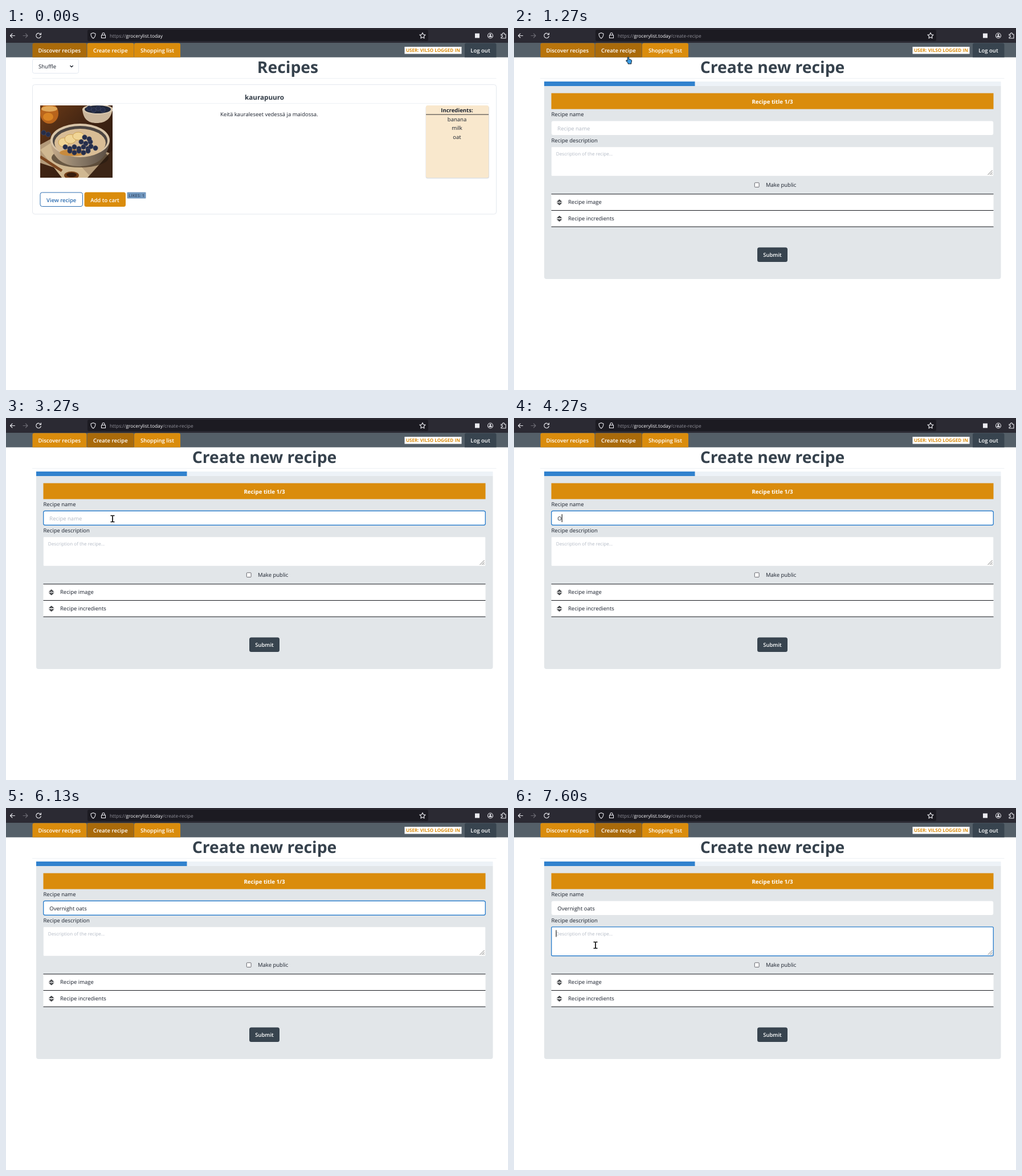
An HTML page for the animation above (8000 ms loop, 881 by 636 pixels).

```html
<!DOCTYPE html>
<html lang="en">
<head>
<meta charset="utf-8">
<title>Recipes</title>
<style>
  html, body { margin: 0; width: 100%; height: 100%; overflow: hidden; background: #fff; }
  svg { display: block; width: 881px; height: 636px; }
  text { font: 9.5px "Open Sans", "Noto Sans", sans-serif; fill: #1a202c; text-rendering: geometricPrecision; white-space: pre; }
  .mid { text-anchor: middle; }
  .semi { font-weight: 600; }
  .bold { font-weight: 700; }
  .white { fill: #fff; }
  .title { font-size: 28.3px; font-weight: 700; fill: #36424d; }
  .hint { fill: #b3bac5; }
  .url { font-size: 8.35px; fill: #fbfbfe; }
  .dim { fill: #92929b; }
  .icon { fill: none; stroke: #ececf1; stroke-width: 1.1; stroke-linecap: round; stroke-linejoin: round; }
  .rule { stroke: #edf1f5; }
  .dark { stroke: #15181d; }
</style>
</head>
<body>
<svg viewBox="0 0 881 636">
  <defs>
    <linearGradient id="table" x2="1" y2="1">
      <stop offset="0" stop-color="#6d3b17"/><stop offset=".45" stop-color="#402413"/><stop offset="1" stop-color="#2b190f"/>
    </linearGradient>
    <linearGradient id="glaze" x2="1">
      <stop offset="0" stop-color="#c6ab8a"/><stop offset=".4" stop-color="#93836f"/><stop offset="1" stop-color="#574b41"/>
    </linearGradient>
    <clipPath id="frame"><rect x="60" y="136" width="127" height="127"/></clipPath>
    <g id="sorter">
      <circle r="5.2" fill="#dcdcdc"/>
      <path d="M-4.2-.9 0-5 4.2-.9zM-4.2 .9 0 5 4.2 .9z" fill="#25282c"/>
      <path d="M-1.6-1.4 0-3 1.6-1.4zM-1.6 1.4 0 3 1.6 1.4z" fill="#aaa"/>
    </g>
  </defs>

  <!-- browser bar -->
  <rect width="881" height="26" fill="#2b2a33"/>
  <rect x="143" y="3" width="598" height="20" rx="3" fill="#1c1b22"/>
  <g class="icon">
    <path d="M15.5 13.5h-8m3.5-3.5-3.5 3.5 3.5 3.5"/>
    <path d="M30 13.5h8m-3.500-3.500 3.500 3.500-3.500 3.500" stroke="#6c6b74"/>
    <path d="M61 11.500A4.300 4.300 0 1 0 61.300 14.500M61.500 8.800v3h-3"/>
    <path d="M153 8.500 157 10c0 4-1 6.500-4 8.300-3-1.800-4-4.300-4-8.300z"/>
    <path d="M167.500 12.500h7v5h-7zM169 12.500v-2a2 2 0 0 1 4 0v2"/>
    <path d="m731 8.300 1.500 3.200 3.500.5-2.600 2.500.7 3.500-3.100-1.700-3.100 1.700.7-3.500-2.600-2.500 3.500-.5z"/>
    <circle cx="850" cy="13.500" r="4.500"/>
    <path d="M869 11h2.500v-1a1.500 1.500 0 0 1 3 0v1h2.500v7h-8v-2h1a1.500 1.500 0 0 0 0-3h-1z"/>
  </g>
  <circle cx="850" cy="12" r="1.600" fill="#ececf1"/><path d="M847 16a3 2.300 0 0 1 6 0z" fill="#ececf1"/>
  <rect x="823" y="9.500" width="8" height="8" fill="#ececf1"/>
  <text class="url" x="182" y="16.500"><tspan class="dim">https://</tspan>grocerylist.today<tspan class="dim" id="path"></tspan></text>

  <!-- navigation -->
  <rect y="26" width="881" height="25.500" fill="#545f68"/>
  <path id="discover" d="M46.500 51.500V29.500a3 3 0 0 1 3-3h89a3 3 0 0 1 3 3v22z"/>
  <path id="create" d="M142.500 51.500V29.500a3 3 0 0 1 3-3h76a3 3 0 0 1 3 3v22z"/>
  <path d="M225 51.500V29.500a3 3 0 0 1 3-3h75a3 3 0 0 1 3 3v22z" fill="#da8c0c"/>
  <path d="M805 51.500V29.500a3 3 0 0 1 3-3h49.500a3 3 0 0 1 3 3v22z" fill="#38444f"/>
  <g class="mid">
    <text class="semi white" x="93.800" y="43.300">Discover recipes</text>
    <text class="semi white" x="183.300" y="43.300">Create recipe</text>
    <text class="semi white" x="265.400" y="43.300">Shopping list</text>
    <text class="semi white" x="832.500" y="43.300">Log out</text>
  </g>
  <rect x="699.500" y="33" width="100" height="12.500" fill="#fff"/>
  <text class="mid bold" x="749.300" y="42.300" style="font-size:8.100px;fill:#da8c0c">USER: VILSO LOGGED IN</text>
  <path class="rule" d="M46 88.500H860.500"/>

  <!-- recipe list -->
  <g id="list">
    <rect x="46.500" y="54.500" width="81" height="25" rx="3" fill="#fff" stroke="#e2e8f0"/>
    <text x="57" y="70.500">Shuffle</text>
    <path d="m112.500 66 2.600 2.600 2.600-2.600" fill="none" stroke="#1a202c" stroke-width="1.400"/>
    <text class="title mid" x="494.500" y="79.300">Recipes</text>
    <rect x="46.500" y="99.500" width="814" height="227.500" rx="4" fill="#fff" stroke="#e4e8ee"/>
    <text class="mid bold" x="453.500" y="126" style="font-size:11.700px;fill:#2f3944">kaurapuuro</text>
    <path class="rule" d="M60 132.500H847"/>
    <text class="mid" x="461.800" y="155.300">Keitä kauraleseet vedessä ja maidossa.</text>

    <g clip-path="url(#frame)">
      <rect x="60" y="136" width="127" height="127" fill="url(#table)"/>
      <path d="M60 205 95 186 187 222V263H138L60 237z" fill="#b39a79"/>
      <path d="M60 214 88 196 150 263H98z" fill="#d0b891"/>
      <path d="M143 263 187 214V263z" fill="#3c2516"/>
      <ellipse cx="76" cy="150" rx="16" ry="18" fill="#b8641c"/>
      <ellipse cx="76" cy="142" rx="14" ry="5" fill="#e2a95a"/>
      <ellipse cx="74" cy="156" rx="9" ry="7" fill="#d98424"/>
      <path d="M134 142c1 17 9 25 25 25s26-8 28-25z" fill="#cbb79c"/>
      <ellipse cx="161" cy="143" rx="27" ry="9" fill="#d8c7ae"/>
      <ellipse cx="161" cy="143" rx="23" ry="7" fill="#20273a"/>
      <ellipse cx="130" cy="228" rx="50" ry="17" fill="#251910" opacity=".6"/>
      <path d="M78 198c1 27 19 45 51 45s51-18 53-45z" fill="url(#glaze)"/>
      <ellipse cx="130" cy="197" rx="52" ry="29" fill="#d9c5a8"/>
      <ellipse cx="130" cy="198" rx="48" ry="26" fill="#4c4541"/>
      <ellipse cx="130" cy="202" rx="45" ry="25" fill="#d9bd95"/>
      <ellipse cx="118" cy="219" rx="24" ry="6" fill="#c88a3d"/>
      <g fill="#f0d596" stroke="#cfa456">
        <ellipse cx="101" cy="201" rx="9" ry="8"/><ellipse cx="113" cy="195" rx="10" ry="8"/><ellipse cx="127" cy="190" rx="10" ry="7"/>
      </g>
      <g id="berries" fill="#252d49" stroke="#49536f" stroke-width=".6"></g>
      <path d="M60 226 98 251" stroke="#7c4720" stroke-width="5"/>
      <ellipse cx="115" cy="259" rx="13" ry="7" fill="#744019"/><ellipse cx="115" cy="258" rx="9" ry="4" fill="#361c0d"/>
    </g>

    <rect x="736.500" y="137" width="111.500" height="127.500" rx="3.500" fill="#dddfe2"/>
    <rect x="737" y="136" width="110" height="127" rx="3" fill="#f9e8cd"/>
    <path class="dark" d="M737 152H847" stroke-width=".9"/>
    <g class="mid">
      <text class="bold" x="791.500" y="148.300">Incredients:</text>
      <text x="791.500" y="164">banana</text>
      <text x="791.500" y="179.300">milk</text>
      <text x="791.500" y="194.600">oat</text>
    </g>
    <rect x="60" y="289" width="74.500" height="24.500" rx="3.500" fill="#fff" stroke="#2b6cb0"/>
    <text class="mid semi" x="97.200" y="305.500" style="fill:#2b6cb0">View recipe</text>
    <rect x="137.500" y="288.500" width="72.500" height="25.500" rx="3.500" fill="#da8c0c"/>
    <text class="mid semi white" x="173.500" y="305.500">Add to cart</text>
    <rect x="212.500" y="288.500" width="33" height="11" rx="1" fill="#7298bf"/>
    <text class="mid bold" x="229" y="296.800" style="font-size:7.300px;fill:#40597a">LIKES: 1</text>
  </g>

  <!-- recipe form -->
  <g id="form">
    <text class="title mid" x="453.500" y="79.300">Create new recipe</text>
    <path d="M53 102H854.500V437a4 4 0 0 1-4 4H57a4 4 0 0 1-4-4z" fill="#e2e6e9"/>
    <rect x="53" y="94" width="801.500" height="8" fill="#edf2f7"/>
    <rect x="53" y="94" width="264.500" height="8" fill="#3182ce"/>
    <rect x="65.500" y="114.500" width="776" height="28" fill="#da8c0c"/>
    <text class="mid bold white" x="453.500" y="133" style="font-size:9.700px">Recipe title 1/3</text>
    <text x="65.500" y="154.600">Recipe name</text>
    <rect x="65.800" y="163.500" width="775.400" height="24.500" rx="3" fill="#fff"/>
    <rect id="nameRing" x="65.700" y="163.200" width="775.600" height="25" rx="3" fill="none" stroke="#3182ce" stroke-width="1.400"/>
    <text id="name" x="76.300" y="180"></text>
    <rect id="nameCaret" y="169" width="1" height="14"/>
    <text x="65.500" y="200.500">Recipe description</text>
    <rect x="65.800" y="209.200" width="775.400" height="50.500" rx="1" fill="#fff"/>
    <rect id="textRing" x="65.700" y="208.900" width="775.600" height="50.800" rx="2" fill="none" stroke="#3182ce" stroke-width="1.400"/>
    <text class="hint" x="73.800" y="224" style="font-size:8.150px">Description of the recipe...</text>
    <rect id="textCaret" x="73.500" y="214.500" width="1" height="12"/>
    <path d="m831.500 258 8-8m-4.500 8 4.500-4.500m-1.500 4.500 1.500-1.500" stroke="#555" stroke-width=".8"/>
    <rect x="422.300" y="271.800" width="7.800" height="7.800" rx="1" fill="#fff" stroke="#66666d"/>
    <text x="442" y="279">Make public</text>
    <rect x="65.500" y="292" width="776" height="57" fill="#fff"/>
    <path class="dark" d="M65.500 291.800h776m-776 28.700h776m-776 28.700h776"/>
    <use href="#sorter" x="79.700" y="306.300"/><use href="#sorter" x="79.700" y="335"/>
    <text x="95" y="309">Recipe image</text>
    <text x="95" y="337.600">Recipe incredients</text>
    <rect x="427" y="385.500" width="53" height="25.500" rx="3.500" fill="#38444f"/>
    <text class="mid semi white" x="453.500" y="402.300">Submit</text>
  </g>

  <!-- pointers, tip or centre at 0,0 -->
  <g id="arrow" stroke="#10161f" stroke-linejoin="round"><path d="M0 0V11L2.700 8.500 4.500 12.500 6.300 11.700 4.600 7.900H8z" fill="#3a9de6"/></g>
  <g id="hand" stroke="#10161f" stroke-linejoin="round"><path d="M-1.300 1.300Q0-.6 1.300 1.300V4.500l3.600.9q1.400.5 1.200 2L5.300 10.500V12.500H-.5V11L-3.800 7.300q0-1.700 1.300-1.200l1.200 1z" fill="#3a9de6"/></g>
  <g id="beam" fill="none"><path d="M-3.500-5.500h2.500l1 .6 1-.6h2.500M0-5V5M-3.500 5.500h2.500l1-.6 1 .6h2.500" stroke="#0a0a0a" stroke-width="1.700"/></g>
</svg>
<script>
const LOOP = 8000, OPEN = 1270, FOCUS = 2330, NEXT = 7420, BLINK = 533;
const $ = id => document.getElementById(id);
const clamp = v => Math.max(0, Math.min(1, v));
const ramp = (t, start, span = 200) => clamp((t - start) / span);
const show = (id, on) => $(id).style.display = on ? '' : 'none';
const mix = (a, b, k) => `rgb(${a.map((v, i) => Math.round(v + (b[i] - v) * k))})`;

const ORANGE = [218, 140, 12], ACTIVE = [169, 106, 10], HOVER = [176, 113, 22];

// time, x, y
const route = [
  [70, 874, 622], [400, 420, 300], [620, 43, 112], [870, 200.5, 50.5], [1400, 200.5, 50.5],
  [1730, 202, 150], [2000, 202, 172], [2270, 200.5, 175], [2670, 200.5, 175], [2800, 199, 168],
  [2930, 187, 177], [3270, 187, 177], [3470, 186, 174], [6670, 186, 174], [6850, 180, 163],
  [7400, 143, 241], [8000, 143, 241]
];
const typing = [[4270, 'O'], [5600, 'Overnight'], [5670, 'Overnight oa'], [6130, 'Overnight oats']];

function pointerAt(t) {
  const i = Math.max(1, route.findIndex(p => p[0] > t));
  const [a, b] = [route[i - 1], route[i]];
  const k = ramp(t, a[0], b[0] - a[0]), e = k * k * (3 - 2 * k);
  return [a[1] + (b[1] - a[1]) * e, a[2] + (b[2] - a[2]) * e];
}

function drawPointer(t) {
  const [x, y] = pointerAt(t);
  const inField = t > OPEN && ((y > 163 && y < 189) || y > 209);
  const onTab = y < 51.5 && x > 46 && x < 306;
  const kind = inField ? 'beam' : onTab ? 'hand' : 'arrow';
  const visible = t >= 70 && (t < 4270 || t >= 6670);
  for (const id of ['arrow', 'hand', 'beam']) show(id, visible && id === kind);
  $(kind).setAttribute('transform', `translate(${x} ${y})`);
}

function drawName(t) {
  const typed = typing.filter(s => t >= s[0]).pop()?.[1] || '';
  const name = $('name');
  name.textContent = typed || 'Recipe name';
  name.setAttribute('class', typed ? '' : 'hint');
  const fresh = (t >= 4270 && t < 4530) || (t >= 5670 && t < 6130);
  const lit = fresh || Math.floor((t - 2400) / BLINK + 0.01) % 2 === 0;
  show('nameCaret', t >= FOCUS && t < NEXT && lit);
  $('nameCaret').setAttribute('x', 76.3 + (typed ? name.getComputedTextLength() : 0));
  $('nameRing').style.opacity = ramp(t, FOCUS) * (1 - ramp(t, NEXT, 150));
}

function draw(t) {
  const form = t >= OPEN;
  show('list', !form);
  show('form', form);
  $('path').textContent = form ? '/create-recipe' : '';
  $('discover').style.fill = mix(ACTIVE, ORANGE, form ? ramp(t, 1210) : 0);
  $('create').style.fill = form ? mix(ACTIVE, ACTIVE, 0) : mix(ORANGE, HOVER, ramp(t, 800));
  drawName(t);
  $('textRing').style.opacity = ramp(t, NEXT, 170);
  show('textCaret', t >= NEXT);
  drawPointer(t);
}

function addBerries() {
  const rows = [[132, 200, 3], [104, 209, 6], [112, 216, 5], [138, 192, 2], [149, 208, 2], [146, 141, 4], [66, 184, 2]];
  $('berries').innerHTML = rows.map(([x, y, n]) => Array.from({ length: n }, (_, i) =>
    `<circle cx="${x + i * 8}" cy="${y + (i % 2) * 3}" r="4.2"/>`).join('')).join('');
}

addBerries();
const begin = performance.now();
(function tick() {
  draw((performance.now() - begin) % LOOP);
  requestAnimationFrame(tick);
})();
</script>
</body>
</html>
```
